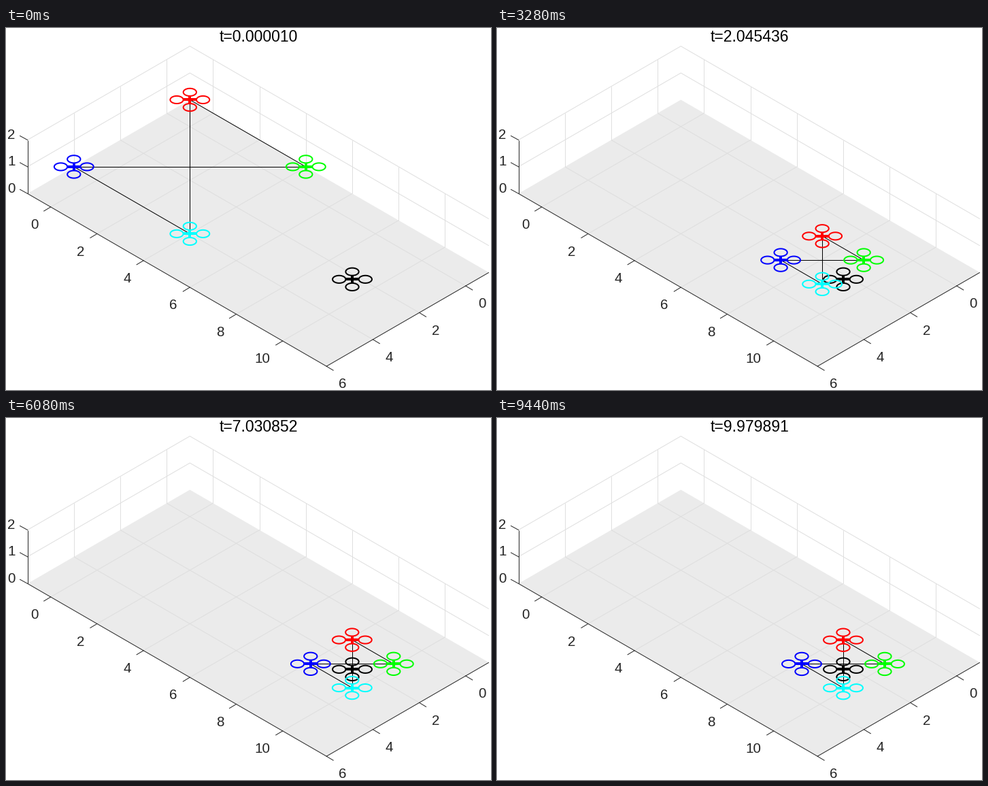
Write a matplotlib script that moves like this. It is 713 by 532 pixels and loops after 9.52 s.

```python
import numpy as np
import matplotlib.pyplot as plt
from matplotlib.animation import FuncAnimation

W, H, DPI = 713, 532, 100
FRAMES, INTERVAL = 119, 80
FIRST_RUN = 99          # frames showing every solver output; the rest skip by 5
PX = 72 / DPI           # one pixel in points

X0, X1, Y0, Y1 = -1, 11.89, -1, 6
GOAL = np.array([10.0, 3.0])
START = np.array([2.5, 2.5])
SIDE0, SIDE1 = 5.0, 1.789
CORNERS = np.array([[-.5, -.5], [.5, -.5], [-.5, .5], [.5, .5]])
COLORS = ["red", "lime", "blue", "cyan"]
LINKS = [(0, 1), (0, 3), (1, 2), (2, 3)]


def project(x, y, z=0.0):
    """Isometric view in pixels, origin at the top left."""
    x, y, z = np.broadcast_arrays(x, y, z)
    return (270.3 + 34.1 * (x - y),
            105.5 + 19.69 * (x + y + 2) - 39.4 * z)


# Solver times: steps grow fivefold at first, four outputs per step.
H0 = 0.078491 / 3906
KNOTS = [(32, .88), (34, 1.15761), (36, 1.43522), (52, 2.83),
         (53, 2.950135), (56, 3.31054), (78, 7.030852),
         (96, 9.919564), (99, 9.979891), (100, 10.0)]


def solver_times():
    k = np.arange(0, 29, 4)
    ends = H0 * (5.0 ** (k // 4) - 1) / 4
    ks = list(k) + [p[0] for p in KNOTS]
    ts = list(ends) + [p[1] for p in KNOTS]
    return np.interp(np.arange(101), ks, ts)


TIMES = solver_times()


def time_at(i):
    return TIMES[i + 2] if i < FIRST_RUN else TIMES[4 + 5 * (i - FIRST_RUN)]


def positions(t):
    """Centre decays to the goal, side shrinks against a steep repulsion."""
    center = GOAL + (START - GOAL) * np.exp(-t)
    eq = SIDE1 ** 6
    side = (eq + (SIDE0 ** 6 - eq) * np.exp(-6 * t)) ** (1 / 6)
    return center + side * CORNERS


fig = plt.figure(figsize=(W / DPI, H / DPI), dpi=DPI, facecolor="white")
ax = fig.add_axes([0, 0, 1, 1])
ax.set_xlim(0, W)
ax.set_ylim(H, 0)
ax.axis("off")


def line3(x, y, z, color, width=1, order=1):
    u, v = project(x, y, z)
    ax.plot(u, v, color=color, lw=width * PX, zorder=order,
            solid_capstyle="butt")


def label(x, y, s, ha, size=20.6, color="#262626"):
    return ax.text(x, y, s, ha=ha, va="baseline", color=color,
                   fontname="Liberation Sans", fontsize=size * PX)


def tick(x, y, z, dx, dy):
    u, v = project(x, y, z)
    ax.plot([u, u + dx], [v, v + dy], color="#262626", lw=PX, zorder=2)
    return float(u), float(v)


def draw_stage():
    floor = project(np.array([X0, X1, X1, X0]), np.array([Y0, Y0, Y1, Y1]))
    ax.fill(*floor, color="#ebebeb", lw=0, zorder=0)
    wall, ground, axis = "#dfdfdf", "#dedede", "#262626"
    for x in range(0, 11, 2):
        line3([x, x], [Y0, Y1], 0, ground)
        line3([x, x], [Y0, Y0], [0, 2], wall)
    for y in range(0, 5, 2):
        line3([X0, X1], [y, y], 0, ground)
        line3([X0, X0], [y, y], [0, 2], wall)
    for z in (1, 2):
        line3([X0, X0, X1], [Y1, Y0, Y0], z, wall)
    line3([X0, X1, X1], [Y1, Y1, Y0], 0, axis, order=2)
    line3([X0, X0], [Y1, Y1], [0, 2], axis, order=2)

    for x in range(0, 11, 2):
        u, v = tick(x, Y1, 0, -10, 6)
        label(u - 18.5, v + 32.2, str(x), "right")
    for y in range(0, 7, 2):
        u, v = tick(X1, y, 0, 10, 6)
        label(u + 18.3, v + 32.2, str(y), "left")
    for z in range(3):
        u, v = tick(X0, Y1, z, -11, -6)
        label(u - 23.7, v - 1.8, str(z), "center")


ANGLE = np.linspace(0, 2 * np.pi, 41)


def rotor_shape():
    parts = []
    for a in np.pi / 4 + np.arange(4) * np.pi / 2:
        ring = .4 * np.array([[np.cos(a)], [np.sin(a)]])
        parts += [ring + .2 * np.array([np.cos(ANGLE), np.sin(ANGLE)]),
                  np.full((2, 1), np.nan)]
    return np.hstack(parts)


ROTORS = rotor_shape()
R = .2 / np.sqrt(2)
ARMS = np.array([[-R, R, np.nan, -R, R], [-R, R, np.nan, R, -R]])


class Drone:
    def __init__(self, color, order):
        self.parts = [(shape, ax.plot([], [], color=color, lw=w * PX,
                                      zorder=order,
                                      solid_capstyle="butt")[0])
                      for shape, w in ((ROTORS, 2), (ARMS, 4))]

    def move(self, x, y, z):
        for shape, line in self.parts:
            line.set_data(*project(x + shape[0], y + shape[1], z))


draw_stage()
title = label(371.5, 19.5, "", "center", size=23, color="black")
links = [ax.plot([], [], color="black", lw=PX, zorder=3)[0] for _ in LINKS]
Drone("black", 4).move(*GOAL, .8)
drones = [Drone(c, 5 + n) for n, c in enumerate(COLORS)]


def update(i):
    t = time_at(i)
    pos = positions(t)
    title.set_text(f"t={t:.6f}")
    for drone, p in zip(drones, pos):
        drone.move(*p, 1)
    for line, (a, b) in zip(links, LINKS):
        line.set_data(*project(pos[[a, b], 0], pos[[a, b], 1], 1))
    return [title, *links]


anim = FuncAnimation(fig, update, frames=FRAMES, interval=INTERVAL,
                     init_func=lambda: update(0), repeat=True,
                     repeat_delay=0, blit=False)
plt.show()
```
